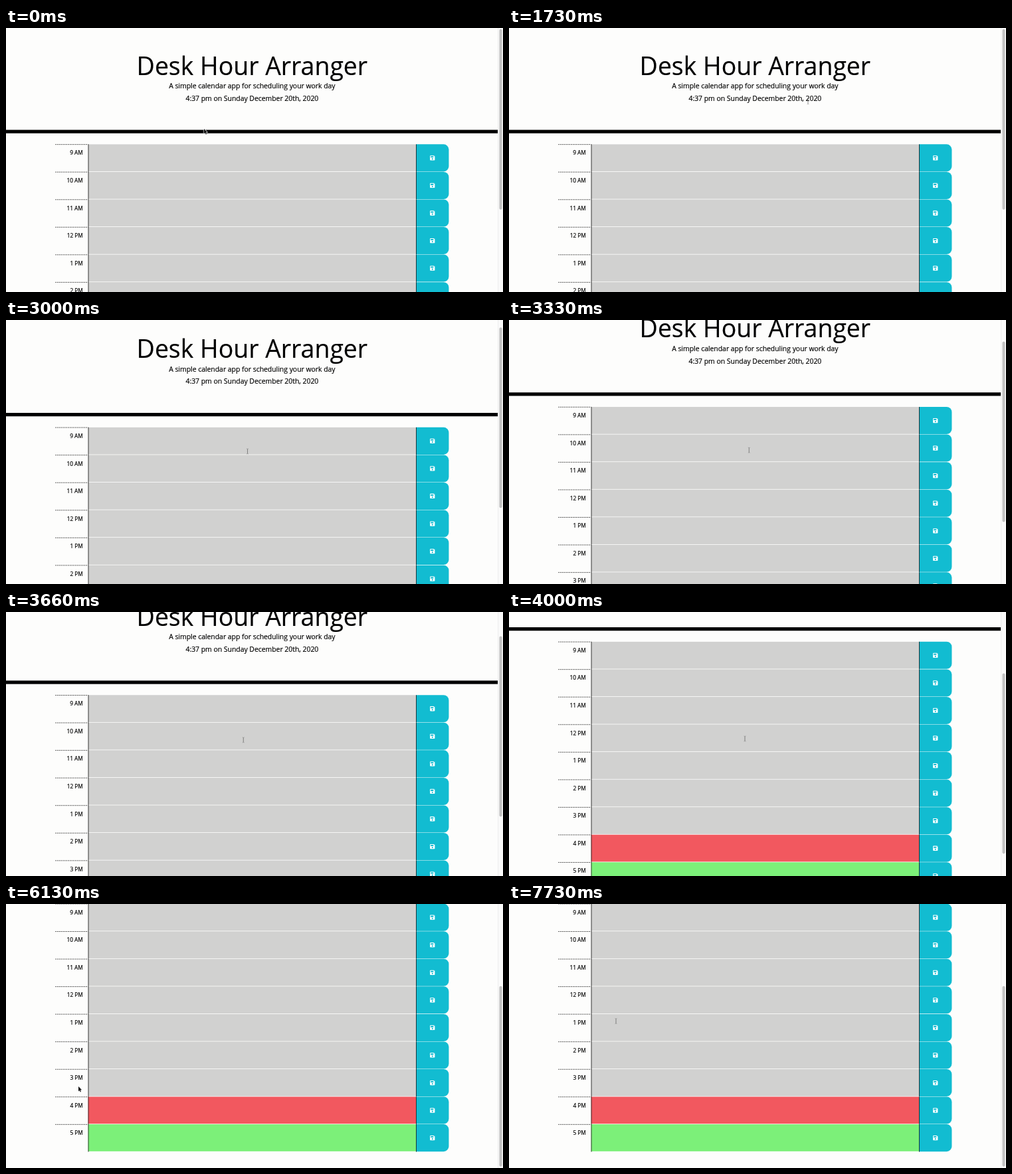
An HTML page with a canvas that plays this animation: 748 by 398 pixels, repeating every 8000 ms.

```html
<!DOCTYPE html>
<html lang="en">
<head>
<meta charset="utf-8">
<title>Desk Hour Arranger</title>
<style>
  html, body { margin: 0; width: 100%; height: 100%; overflow: hidden; background: #fdfdfc; }
  canvas { display: block; width: 748px; height: 398px; }
</style>
</head>
<body>
<canvas id="stage"></canvas>
<script>
const W = 748, H = 398, LOOP = 8000;
const S = W / 1440;              // page pixels to stage pixels
const TOP = 337.6, ROW = 80;     // first row and row height, page pixels
const LEFT = 143, COL = 95;
const DESC = LEFT + COL, SAVE = DESC + COL * 10, RIGHT = SAVE + COL;
const MID = (LEFT + RIGHT) / 2;
const PAPER = '#fdfdfc', TEAL = '#12bcd1';
const FONT = '"Open Sans", "Noto Sans", sans-serif';

const canvas = document.getElementById('stage');
const ctx = canvas.getContext('2d');
const dpr = window.devicePixelRatio || 1;
canvas.width = Math.round(W * dpr);
canvas.height = Math.round(H * dpr);

// 0 before start, 1 after end, eased between
function ease(t, start, end) {
  const u = Math.min(1, Math.max(0, (t - start) / (end - start)));
  return u * u * (3 - 2 * u);
}

// two flicks of the wheel
const scrollAt = t => 50 * ease(t, 2750, 3485) + 125.7 * ease(t, 3650, 4240);

function pointerAt(t) {
  let x = 298, y = 152;
  const glide = (start, end, toX, toY) => {
    const k = ease(t, start, end);
    x += (toX - x) * k;
    y += (toY - y) * k;
  };
  glide(60, 450, 276, 134);
  glide(450, 1730, 450, 111);
  glide(1730, 2060, 470, 109);
  glide(2330, 3000, 363.5, 198);
  glide(3000, 4000, 355, 191);
  glide(4930, 5480, 66, 268);
  glide(5480, 6130, 109, 275);
  glide(6560, 6730, 99, 270);
  glide(7100, 7730, 161, 176.5);
  return [x, y];
}

function box(x, y, w, h, fill) {
  ctx.fillStyle = fill;
  ctx.fillRect(x, y, w, h);
}

function round(x, y, w, h, r, fill) {
  ctx.fillStyle = fill;
  ctx.beginPath();
  ctx.roundRect(x, y, w, h, r);
  ctx.fill();
}

function text(str, x, y, size, align) {
  ctx.font = size + 'px ' + FONT;
  ctx.textAlign = align;
  ctx.fillStyle = ctx.strokeStyle = '#000';
  ctx.lineWidth = 0.35;
  ctx.fillText(str, x, y);
  ctx.strokeText(str, x, y);
}

function drawHeader() {
  text('Desk Hour Arranger', MID, 136, 72, 'center');
  text('A simple calendar app for scheduling your work day', MID, 175.6, 20, 'center');
  text('4:37 pm on Sunday December 20th, 2020', MID, 211.6, 20, 'center');
  box(0, TOP - 42, 1425, 10, '#000');
}

function drawDisk(x, y) {
  ctx.fillStyle = '#fff';
  ctx.beginPath();
  ctx.roundRect(x - 7, y - 7, 14, 14, 1.5);
  ctx.fill();
  ctx.fillStyle = TEAL;
  ctx.beginPath();
  ctx.moveTo(x + 3.5, y - 7.2);
  ctx.lineTo(x + 7.2, y - 7.2);
  ctx.lineTo(x + 7.2, y - 3.5);
  ctx.fill();
  ctx.beginPath();
  ctx.rect(x - 5, y - 5, 8, 4);
  ctx.arc(x, y + 3, 2.1, 0, Math.PI * 2);
  ctx.fill();
}

function drawRow(hour) {
  const y = TOP + (hour - 9) * ROW;
  const label = hour > 12 ? hour - 12 + ' PM' : hour + (hour < 12 ? ' AM' : ' PM');
  const fill = hour < 16 ? '#d1d1d0' : hour === 16 ? '#f2585f' : '#7cf079';
  text(label, DESC - 15, y + 31, 16, 'right');
  ctx.lineWidth = 1.4;
  ctx.setLineDash([3.2, 2]);
  ctx.beginPath();
  ctx.moveTo(LEFT, y + 0.5);
  ctx.lineTo(DESC, y + 0.5);
  ctx.stroke();
  ctx.setLineDash([]);
  box(DESC, y, SAVE - DESC, ROW - 1.6, fill);
  round(SAVE, y, COL, ROW - 1, [0, 15, 15, 0], TEAL);
  box(DESC, y, 1.5, ROW, '#111');
  box(SAVE, y, 1.5, ROW, '#111');
  drawDisk(SAVE + COL / 2, y + 39.5);
}

function drawScrollbar(scroll) {
  box(740.5, 0, W - 740.5, H, '#fafafa');
  box(740.5, 0, 0.6, H, '#e6e6e6');
  round(742.5, 1.8 + scroll * 0.694, 4.1, 272, 2.05, '#c0c0c0');
}

function drawArrow() {
  ctx.beginPath();
  ctx.moveTo(0, 0);
  ctx.lineTo(0, 7.4);
  ctx.lineTo(1.7, 5.9);
  ctx.lineTo(2.8, 8.4);
  ctx.lineTo(4, 7.9);
  ctx.lineTo(2.9, 5.4);
  ctx.lineTo(5.1, 5.2);
  ctx.closePath();
  ctx.lineJoin = 'round';
  ctx.strokeStyle = '#fff';
  ctx.lineWidth = 1.1;
  ctx.stroke();
  ctx.fillStyle = '#111';
  ctx.fill();
}

function drawBeam() {
  ctx.strokeStyle = 'rgba(40,40,40,.45)';
  ctx.lineWidth = 0.6;
  ctx.beginPath();
  for (const side of [-1.5, 1.5]) {
    ctx.moveTo(side, -4);
    ctx.quadraticCurveTo(0, -4, 0, -3);
    ctx.lineTo(0, 3);
    ctx.quadraticCurveTo(0, 4, side, 4);
  }
  ctx.stroke();
}

function overText(x, y) {
  const inRow = y > TOP * S && x > DESC * S && x < SAVE * S;
  const inDate = y > 78 && y < 115 && x > 245 && x < 495;
  return inRow || inDate;
}

function draw(t) {
  const scroll = scrollAt(t);
  const [x, y] = pointerAt(t);
  ctx.setTransform(dpr, 0, 0, dpr, 0, 0);
  box(0, 0, W, H, PAPER);
  ctx.save();
  ctx.translate(0, -scroll);
  ctx.scale(S, S);
  drawHeader();
  for (let hour = 9; hour <= 17; hour++) drawRow(hour);
  ctx.restore();
  drawScrollbar(scroll);
  ctx.translate(x, y);
  if (overText(x, y + scroll)) drawBeam();
  else drawArrow();
}

function tick() {
  draw(performance.now() % LOOP);
  requestAnimationFrame(tick);
}
tick();
</script>
</body>
</html>
```
